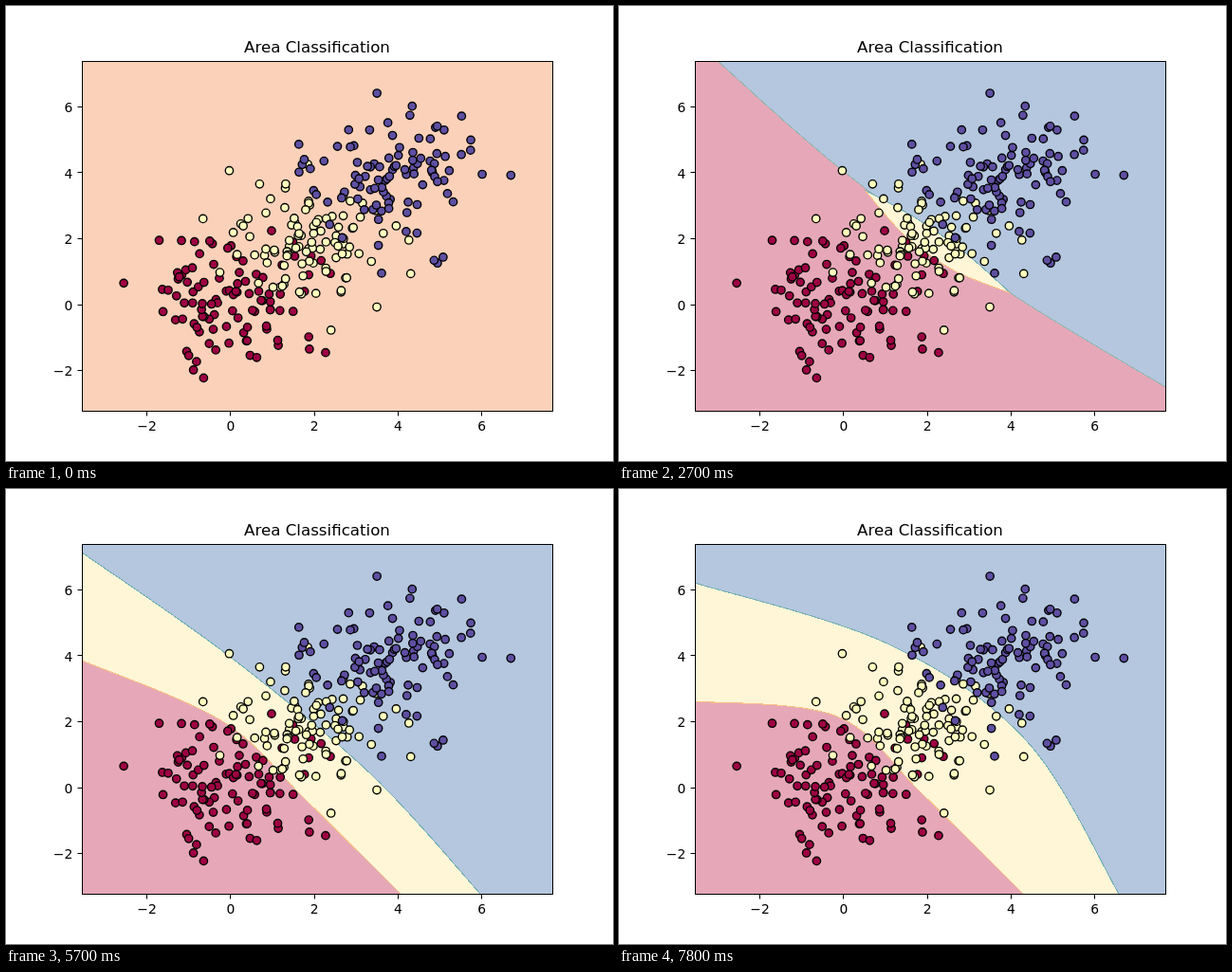
Animation, 640 px wide and 480 px high, one loop 8000 ms. Source, as an HTML page:

```html
<!DOCTYPE html>
<html lang="en">
<head>
<meta charset="utf-8">
<title>Area Classification</title>
<style>
  html, body { margin: 0; width: 100%; height: 100%; overflow: hidden; background: #fff; }
  svg { display: block; width: 640px; height: 480px; font: 13.89px "DejaVu Sans", sans-serif; }
  .title { font-size: 16.67px; }
  .area, .edge { shape-rendering: crispEdges; }
  .edge { fill: none; stroke-width: 1.1; }
  .frame { fill: none; stroke: #000; }
  #dots circle { stroke: #000; stroke-width: 1.39; }
</style>
</head>
<body>
<svg viewBox="0 0 640 480">
  <clipPath id="plot"><rect x="80" y="58" width="496.5" height="369.5"/></clipPath>
  <g clip-path="url(#plot)">
    <rect id="back" class="area" x="80" y="58" width="497" height="370"/>
    <g id="regions">
      <path id="red" class="area" fill="#e6a8b8"/>
      <path id="split" class="edge" stroke="#97b5b0"/>
      <path id="yellow" class="area" fill="#fff6d7"/>
      <path id="low" class="edge" stroke="#f9bf88"/>
      <path id="high" class="edge" stroke="#78b0b6"/>
    </g>
  </g>
  <g id="dots"></g>
  <rect class="frame" x="80.5" y="58.5" width="496" height="369"/>
  <g id="ticks"></g>
  <text class="title" x="328" y="49" text-anchor="middle">Area Classification</text>
</svg>
<script>
const $ = id => document.getElementById(id);

function add(parent, tag, attrs, text = '') {
  const el = document.createElementNS('http://www.w3.org/2000/svg', tag);
  for (const k in attrs) el.setAttribute(k, attrs[k]);
  el.textContent = text;
  parent.append(el);
}

// Mersenne Twister, 53-bit doubles
function twister(seed) {
  const N = 624, mt = new Uint32Array(N);
  let at = N;
  mt[0] = seed;
  for (let i = 1; i < N; i++) {
    mt[i] = Math.imul(1812433253, mt[i - 1] ^ (mt[i - 1] >>> 30)) + i;
  }
  function next() {
    if (at === N) {
      for (let i = 0; i < N; i++) {
        const y = (mt[i] & 0x80000000) | (mt[(i + 1) % N] & 0x7fffffff);
        mt[i] = mt[(i + 397) % N] ^ (y >>> 1) ^ (y & 1 ? 0x9908b0df : 0);
      }
      at = 0;
    }
    let y = mt[at++];
    y ^= y >>> 11;
    y ^= (y << 7) & 0x9d2c5680;
    y ^= (y << 15) & 0xefc60000;
    y ^= y >>> 18;
    return y >>> 0;
  }
  return () => {
    const a = next() >>> 5, b = next() >>> 6;
    return (a * 67108864 + b) / 9007199254740992;
  };
}

// Normal deviates by the polar method
function normal(random) {
  let spare = null;
  return () => {
    if (spare !== null) {
      const v = spare;
      spare = null;
      return v;
    }
    let a, b, r;
    do {
      a = 2 * random() - 1;
      b = 2 * random() - 1;
      r = a * a + b * b;
    } while (r >= 1 || r === 0);
    const f = Math.sqrt(-2 * Math.log(r) / r);
    spare = f * a;
    return f * b;
  };
}

// Three clusters of 100, centred at 0, 2 and 4
const gauss = normal(twister(0));
const colors = ['#9e0142', '#feffbe', '#5e4fa2'];
const data = Array.from({ length: 300 }, (_, i) => {
  const group = Math.floor(i / 100);
  return { x: gauss() + 2 * group, y: gauss() + 2 * group, fill: colors[group] };
});

function scale(key, from, to) {
  const all = data.map(p => p[key]);
  const min = Math.min(...all) - 1, max = Math.max(...all) + 0.99;
  return v => from + (v - min) / (max - min) * (to - from);
}
const sx = scale('x', 80, 576), sy = scale('y', 427.2, 57.6);

for (const p of data) {
  add($('dots'), 'circle', { cx: sx(p.x).toFixed(2), cy: sy(p.y).toFixed(2), r: 4.17, fill: p.fill });
}
for (let v = -2; v <= 6; v += 2) {
  const label = String(v).replace('-', '\u2212');
  const x = Math.floor(sx(v)) + 0.5, y = Math.floor(sy(v)) + 0.5;
  add($('ticks'), 'path', { class: 'frame', d: `M${x} 428v4.5M80 ${y}h-4.5` });
  add($('ticks'), 'text', { x: sx(v), y: 448, 'text-anchor': 'middle' }, label);
  add($('ticks'), 'text', { x: 70.3, y: Math.round(sy(v) + 5.6), 'text-anchor': 'end' }, label);
}

// Each boundary is a smooth curve through four points
const mix = (a, b, k) => a.map((p, i) => p.map((v, j) => v + (b[i][j] - v) * k));

function curve(pts) {
  const at = i => pts[Math.min(3, Math.max(0, i))];
  const handle = (i, s) => at(i).map((v, j) => v + s * (at(i + 1)[j] - at(i - 1)[j]) / 6);
  let d = String(pts[0]);
  for (let i = 0; i < 3; i++) d += ` C${handle(i, 1)} ${handle(i + 1, -1)} ${pts[i + 1]}`;
  return d;
}

// Chord from a to b, its inner points pushed sideways
function bow([ax, ay], [bx, by], push) {
  const dx = bx - ax, dy = by - ay, len = Math.hypot(dx, dy);
  return [0, 1, 2, 3].map(i => {
    const k = i / 3, s = i % 3 ? push / len : 0;
    return [ax + dx * k - dy * s, ay + dy * k + dx * s];
  });
}
const wedge = (split, a, b, up, down) => ({ split, low: bow(a, b, down), high: bow(a, b, -up) });
const band = (low, high) => ({ split: mix(low, high, 0.5), low, high });
const line = bow([80, 58], [472, 427], 0);

const keys = [
  { t: 1500, ...wedge([[110, 58], [230, 169], [395, 287], [640, 395]], [265, 202], [395, 287], 9, 15) },
  { t: 2700, ...wedge([[104, 58], [235, 173], [413, 303], [619, 427]], [259, 194], [413, 303], 7, 15) },
  { t: 4800, power: 3, ...band(line, line) },
  { t: 5700, ...band(
    [[80, 181], [228, 245], [316, 328], [416, 427]],
    [[80, 67], [235, 176], [385, 301], [500, 427]]) },
  { t: 6600, ...band(
    [[80, 218], [230, 240], [330, 337], [430, 427]],
    [[80, 81], [253, 146], [430, 281], [536, 427]]) },
  { t: 7800, ...band(
    [[80, 224], [230, 240], [320, 322], [426, 427]],
    [[80, 99], [285, 164], [430, 266], [527, 427]]) }
];

// Before the first key the first move is extended backwards
function shapeAt(t) {
  const i = Math.max(1, keys.findIndex(k => k.t >= t));
  const a = keys[i - 1], b = keys[i];
  const k = ((t - a.t) / (b.t - a.t)) ** (b.power || 1);
  return name => mix(a[name], b[name], k);
}

const LOOP = 8000, STEP = 300;
let shown = -1;

function draw(t) {
  if (t === shown) return;
  shown = t;
  $('back').setAttribute('fill', t ? '#b4c7df' : '#fbd1ba');
  $('regions').style.display = t ? '' : 'none';
  if (!t) return;
  const shape = shapeAt(t);
  const low = shape('low'), high = shape('high'), split = curve(shape('split'));
  const put = (id, d) => $(id).setAttribute('d', 'M' + d);
  put('red', split + 'V428H80V58Z');
  put('split', split);
  put('yellow', curve(low) + 'L' + curve([...high].reverse()) + 'Z');
  put('low', curve(low));
  put('high', curve(high));
}

const start = performance.now();
function tick() {
  const t = (performance.now() - start) % LOOP;
  draw(Math.floor(t / STEP) * STEP);
  requestAnimationFrame(tick);
}
tick();
</script>
</body>
</html>
```
